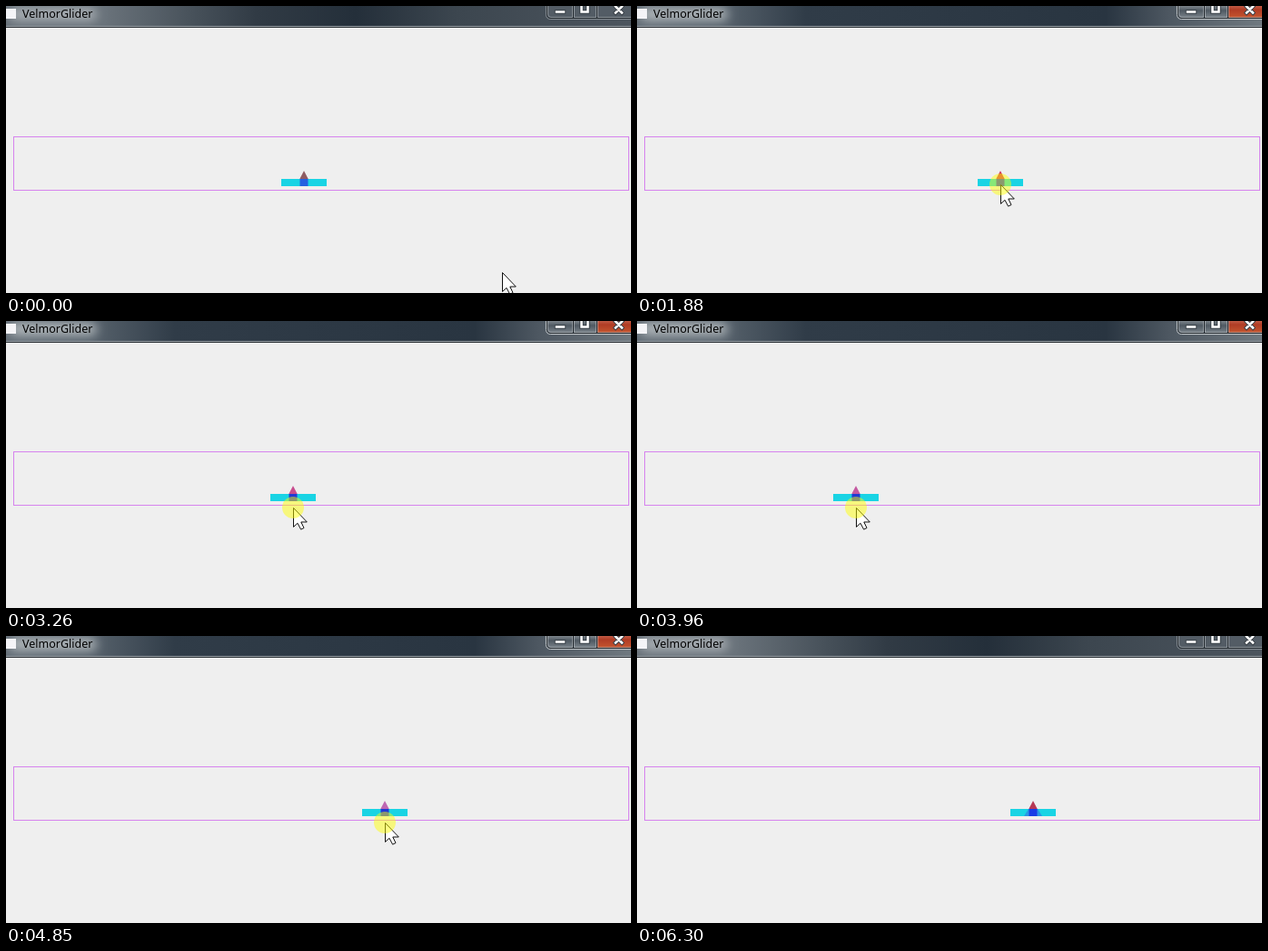
An HTML page for the animation above (6370 ms loop, 688 by 317 pixels).

```html
<!DOCTYPE html>
<html lang="en">
<head>
<meta charset="utf-8">
<title>Slider window</title>
<style>
  html, body { margin: 0; width: 100%; height: 100%; overflow: hidden; background: #efefef; }
  svg { display: block; width: 688px; height: 317px; }
  .title { font: 12.5px "Noto Sans", "Open Sans", sans-serif; fill: #000; }
  .icon { stroke-linecap: square; fill: none; }
</style>
</head>
<body>
<svg viewBox="0 0 688 317">
  <defs>
    <linearGradient id="idleBar">
      <stop offset="0" stop-color="#69727a"/>
      <stop offset=".16" stop-color="#69727a"/>
      <stop offset=".3" stop-color="#47515a"/>
      <stop offset=".4" stop-color="#313b45"/>
      <stop offset=".56" stop-color="#242f3a"/>
      <stop offset=".72" stop-color="#3c464f"/>
      <stop offset="1" stop-color="#4c555e"/>
    </linearGradient>
    <linearGradient id="activeBar">
      <stop offset="0" stop-color="#646e77"/>
      <stop offset=".14" stop-color="#56616b"/>
      <stop offset=".27" stop-color="#303c48"/>
      <stop offset=".75" stop-color="#293541"/>
      <stop offset=".85" stop-color="#4d5761"/>
      <stop offset="1" stop-color="#707980"/>
    </linearGradient>
    <linearGradient id="red" x2="0" y2="1">
      <stop offset="0" stop-color="#c96a56"/>
      <stop offset=".4" stop-color="#b03c25"/>
      <stop offset="1" stop-color="#c4562f"/>
    </linearGradient>
    <linearGradient id="steel" x2="0" y2="1">
      <stop offset="0" stop-color="#8e959b"/>
      <stop offset=".45" stop-color="#4f5962"/>
      <stop offset="1" stop-color="#7c858c"/>
    </linearGradient>
    <filter id="blur" x="-30%" y="-100%" width="160%" height="300%"><feGaussianBlur stdDeviation="6"/></filter>
    <clipPath id="barClip"><rect width="688" height="22"/></clipPath>
    <path id="icons" d="M606 6.500H614M633.500 .5V6.500H640.500V-1M671 .5L678 7.500M678 .5L671 7.500"/>
  </defs>

  <rect width="688" height="317" fill="#efefef"/>

  <rect id="bar" width="688" height="22"/>
  <g clip-path="url(#barClip)">
    <rect id="glow" x="4" y="2" width="96" height="14" rx="7" fill="#c9cdd0" filter="url(#blur)"/>
  </g>
  <rect y="22" width="688" height="1" fill="#99a0a6"/>
  <rect y="23" width="688" height="1" fill="#262c31"/>
  <rect y="3" width="11" height="11" fill="#f4f4f7"/>
  <text class="title" x="18" y="13">VelmorGlider</text>

  <path id="buttons" d="M595-2V9Q595 13.500 599.500 13.500H690V-2Z"/>
  <path id="close" d="M651-2H690V13H651Z"/>
  <g fill="none">
    <path id="rim" d="M594.500-2V9.500Q594.500 14.500 599.500 14.500H690" stroke="#c3c8cb"/>
    <path d="M595.500-2V9Q595.500 13.500 600 13.500H690M624.500 0V13M650.500 0V13" stroke="#20272d"/>
    <path d="M596.500-2V9Q596.500 12.500 600 12.500H623.500V0M625.500 0V12.500H649.500V0M651.500 0V12.500H690" stroke="#c3c8cb" stroke-opacity=".5"/>
  </g>
  <use href="#icons" class="icon" stroke="#3a4148" stroke-width="4.500"/>
  <use href="#icons" class="icon" stroke="#fff" stroke-width="2.500"/>

  <rect x="8.500" y="144.500" width="677" height="59" fill="none" stroke="#d683ee"/>

  <g id="handle">
    <rect x="-25" y="191" width="50" height="8" fill="#19d4e4"/>
    <path id="skirt" d="M-5 191L-10 199H10L5 191Z" fill="#2a96e4"/>
    <path id="tip" d="M0 182L4.700 191H-4.700Z"/>
    <rect id="body" x="-4.500" y="191" width="9" height="8"/>
  </g>

  <path id="cursor" d="M.5.5V21.500L5 17.300L8.600 24.200L12 22.600L8.800 16H15.300Z" fill="#fff" stroke="#111"/>
  <circle id="halo" r="12" fill="#ff0" fill-opacity=".48"/>
</svg>
<script>
const LOOP = 6370, ARRIVE = 1200, PRESS = 1360, DRAG = 1500, RELEASE = 5460, IDLE = 6300;
const REST = 328, END = 436, HOME = [330, 193], DRAG_Y = 206;

// Turning points of the drag: time, x.
const turns = [
  [1435, HOME[0]], [2490, 580], [3730, 185], [3850, 185],
  [3926, 241], [4620, 496], [5000, 373], [5380, END]
];

const $ = id => document.getElementById(id);
const set = (id, attrs) => {
  for (const key in attrs) $(id).setAttribute(key, attrs[key]);
};
const show = (id, on) => set(id, { visibility: on ? 'visible' : 'hidden' });
const mix = (a, b, u) => a + (b - a) * u;
const span = (t, from, to) => Math.min(1, Math.max(0, (t - from) / (to - from)));
const swing = u => (1 - Math.cos(Math.PI * u)) / 2;

// The screen refreshes in even steps, a little slower after the second push.
function snap(t) {
  const [base, step] = t < 4000 ? [70, 75.6] : [4000, 76.8];
  return Math.max(0, base + Math.floor((t - base) / step) * step);
}

function dragX(t) {
  let x = turns[0][1];
  for (let i = 1; i < turns.length; i++) {
    const [from, a] = turns[i - 1], [to, b] = turns[i];
    if (t >= from) x = mix(a, b, swing(span(t, from, to)));
  }
  return x;
}

function pointer(t) {
  if (t < DRAG) {
    const left = (1 - span(t, 0, ARRIVE - 100)) ** 3;
    return [mix(HOME[0], 546, left), mix(HOME[1], 294, left)];
  }
  const away = span(t, RELEASE - 40, 5840);
  const y = mix(HOME[1], DRAG_Y, swing(span(t, ...turns.slice(0, 2).map(k => k[0]))));
  return [mix(dragX(t), 655, away), mix(y, 318, away)];
}

function tints(t) {
  if (t < DRAG) return ['hsl(352 22% 46%)', 'hsl(221 75% 51%)'];
  if (t >= RELEASE) return ['hsl(347 53% 47%)', 'hsl(230 80% 50%)'];
  const p = span(t, DRAG, RELEASE);
  return [`hsl(${350 - 50 * p} ${66 - 30 * p}% ${50 + 9 * p}%)`, 'hsl(232 72% 48%)'];
}

function draw(now) {
  const time = now % LOOP;
  const t = snap(time);
  const [x, y] = pointer(t).map(Math.round);
  const active = time >= PRESS && time < IDLE;
  const held = time >= PRESS && time < RELEASE;
  const centre = t < DRAG ? REST : held ? x : END;
  const [tip, body] = tints(t);

  set('bar', { fill: active ? 'url(#activeBar)' : 'url(#idleBar)' });
  set('glow', { 'fill-opacity': active ? .8 : .7 });
  set('buttons', { fill: active ? 'url(#steel)' : '#535c65' });
  set('close', { fill: active ? 'url(#red)' : '#535c65' });
  set('rim', { 'stroke-opacity': active ? 1 : .5 });

  set('handle', { transform: `translate(${centre})` });
  set('tip', { fill: tip });
  set('body', { fill: body });
  show('skirt', time >= RELEASE);

  set('cursor', { transform: `translate(${x} ${y})` });
  set('halo', { cx: x, cy: y });
  show('halo', held);
}

const start = performance.now();
function frame() {
  draw(performance.now() - start);
  requestAnimationFrame(frame);
}
frame();
</script>
</body>
</html>
```
